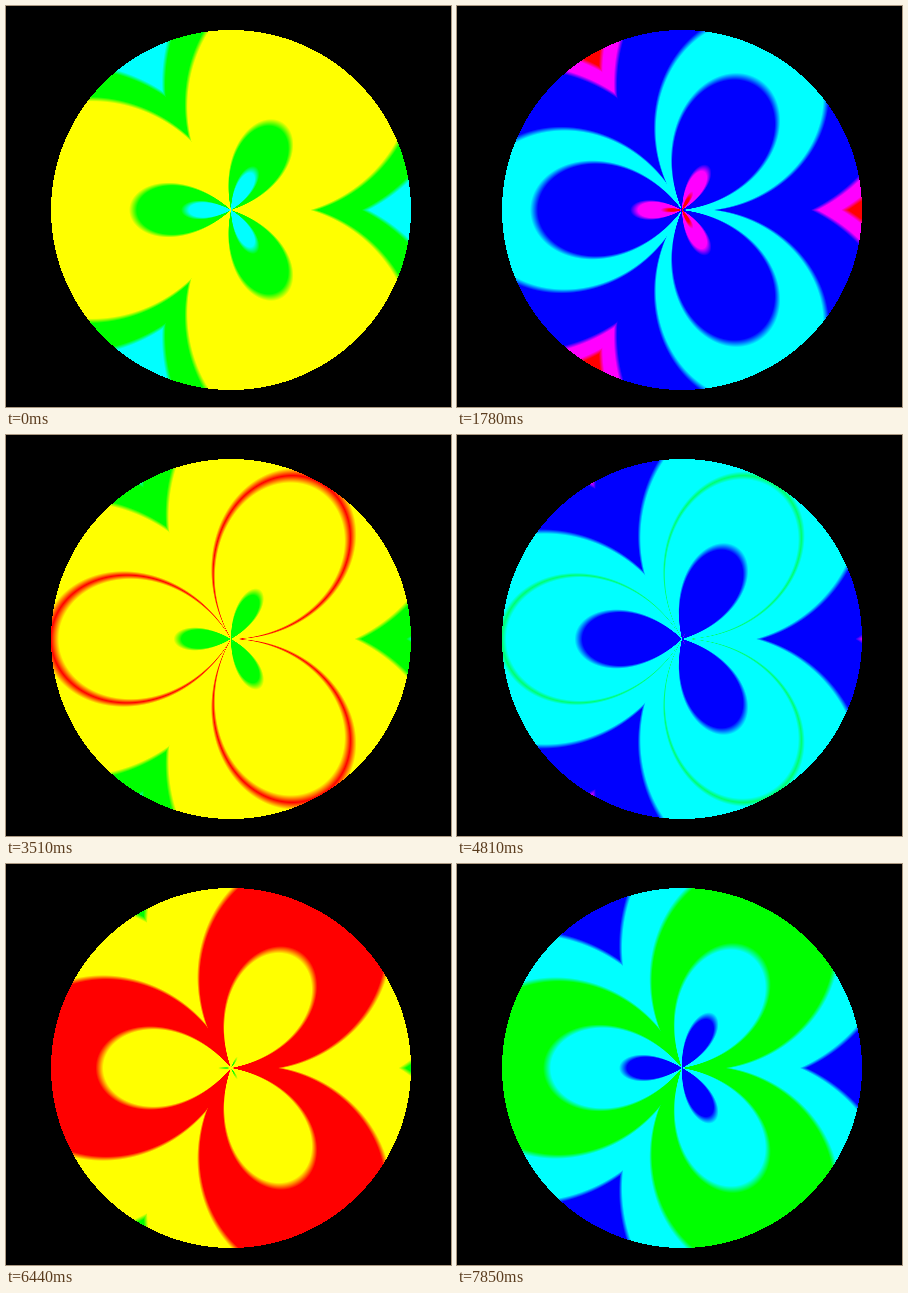
An HTML page with a canvas for the animation above (8000 ms loop, 445 by 401 pixels).

```html
<!DOCTYPE html>
<html lang="en">
<head>
<meta charset="utf-8">
<title>Cycling rose</title>
<style>
html, body { margin: 0; width: 100%; height: 100%; overflow: hidden; background: #000; }
canvas { display: block; }
</style>
</head>
<body>
<canvas id="stage" width="445" height="401"></canvas>
<script>
const W = 445, H = 401, CX = 225, CY = 204, RADIUS = 180;
const LOOP = 8000;
const PERIOD = 445;        // length of one colour cycle, in pixels of distance
const STEP = PERIOD / 10;  // colour shift per step
const START = -82;
const RAMP = 8;            // softness of a colour edge

// Moments at which the colours advance by one step
const times = [0, 920, 1230, 1460, 1780, 2160, 2410, 2780, 3100, 3510, 3790, 4190,
  4490, 4810, 5220, 5520, 5820, 6140, 6440, 6840, 7150, 7450, 7850];

// Each channel is lit on one stretch of the cycle: [from, to]
const channels = [[228.2, 445], [322.5, 573], [52, 258.5]];

const ctx = document.getElementById("stage").getContext("2d");
const image = ctx.createImageData(W, H);
const dist = new Float32Array(W * H);

// Distance along the radius to the three-petalled rose; -1 outside the disc
for (let y = 0; y < H; y++) {
  for (let x = 0; x < W; x++) {
    const dx = x + 0.5 - CX, dy = y + 0.5 - CY;
    const r = Math.hypot(dx, dy);
    const rose = RADIUS * Math.abs(Math.sin(1.5 * Math.atan2(dy, dx)));
    dist[y * W + x] = r <= RADIUS ? Math.abs(r - rose) : -1;
  }
}

function level(phase, [from, to]) {
  const off = phase - (from + to) / 2;
  const gap = Math.abs(off - PERIOD * Math.round(off / PERIOD));
  const v = ((to - from) / 2 - gap) / RAMP + 0.5;
  return 255 * Math.min(1, Math.max(0, v));
}

function draw(step) {
  const shift = START + step * STEP;
  const px = image.data;
  for (let i = 0; i < dist.length; i++) {
    const inside = dist[i] >= 0;
    for (let c = 0; c < 3; c++) {
      px[i * 4 + c] = inside ? level(dist[i] + shift, channels[c]) : 0;
    }
    px[i * 4 + 3] = 255;
  }
  ctx.putImageData(image, 0, 0);
}

let shown = -1;
const origin = performance.now();

function tick() {
  const t = (performance.now() - origin) % LOOP;
  const step = times.filter(s => s <= t).length - 1;
  if (step !== shown) draw(shown = step);
  requestAnimationFrame(tick);
}
tick();
</script>
</body>
</html>
```
